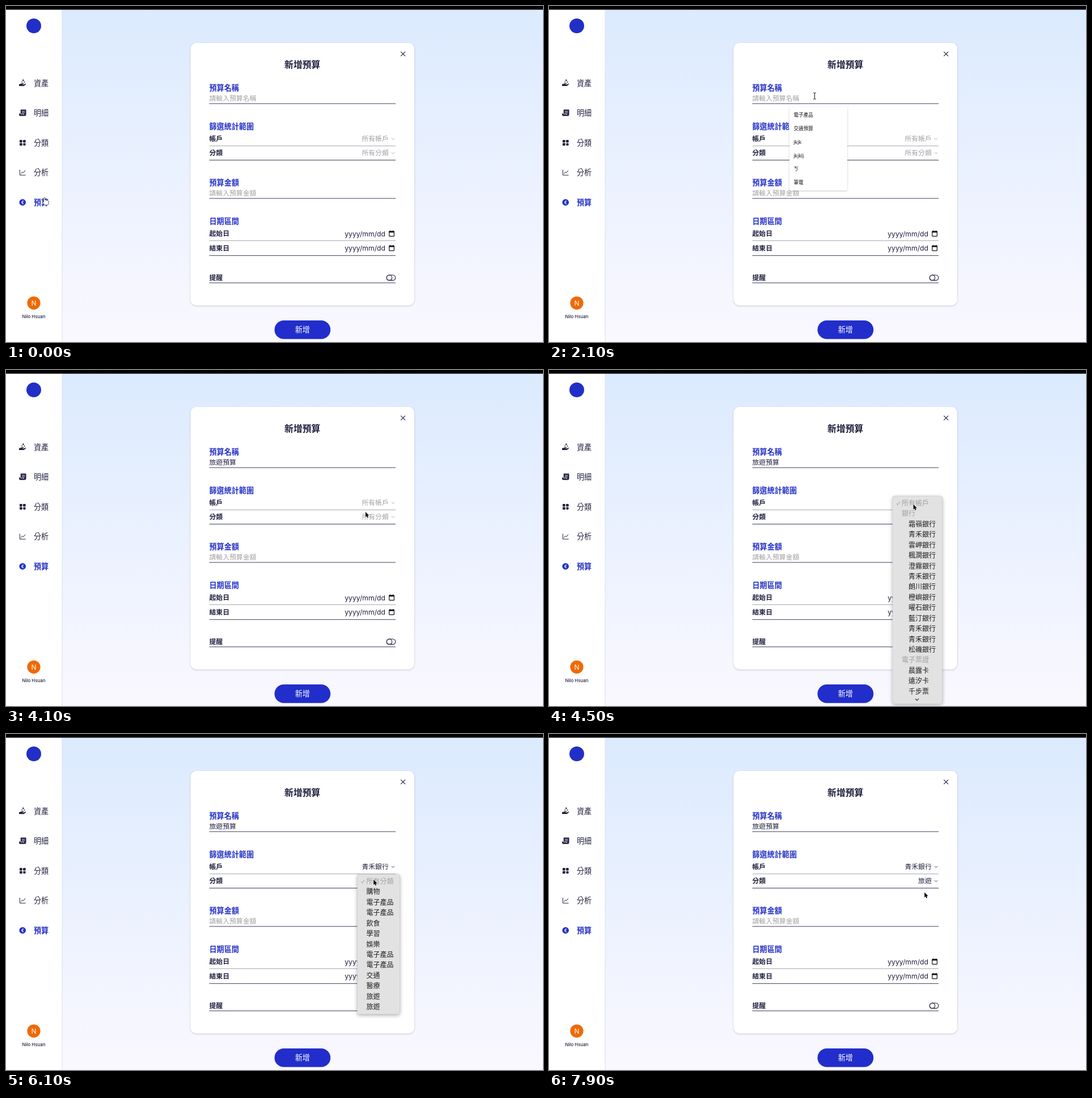
Recreate the animation shown at these times as an HTML page. Size 947 by 592 pixels, loop 8000 ms.

```html
<!DOCTYPE html>
<html lang="zh-TW">
<head>
<meta charset="utf-8">
<title>新增預算</title>
<style>
html, body { margin: 0; width: 100%; height: 100%; overflow: hidden; }
svg { display: block; width: 947px; height: 592px; }
text { font-family: Inter, "Noto Sans CJK TC", "Noto Sans CJK JP", "Noto Sans CJK", sans-serif; white-space: pre; }
</style>
</head>
<body>
<svg viewBox="0 0 947 592">
  <defs>
    <linearGradient id="sky" x2="0" y2="1">
      <stop stop-color="#dbeafe"/><stop offset="1" stop-color="#faf8ff"/>
    </linearGradient>
    <filter id="soft" x="-20%" y="-20%" width="140%" height="140%">
      <feDropShadow dx="0" dy="1" stdDeviation="1.5" flood-opacity=".22"/>
    </filter>
    <filter id="lift" x="-20%" y="-20%" width="140%" height="140%">
      <feDropShadow dx="0" dy="2" stdDeviation="3" flood-opacity=".3"/>
    </filter>
  </defs>
  <g id="page"></g>
  <g id="live"></g>
</svg>
<script>
const NAVY = '#20213f', BLUE = '#222fc6', GRAY = '#a2a2a2', ROW = 18.43, LOOP = 8000;
const page = document.getElementById('page'), live = document.getElementById('live');

// Text placed by the vertical centre of its line
const text = (s, x, cy, size = 11.85, fill = NAVY, weight = 400, anchor = 'start') =>
  `<text x="${x}" y="${cy + size * .37}" font-size="${size}" fill="${fill}" font-weight="${weight}" text-anchor="${anchor}">${s}</text>`;
const rect = (x, y, w, h, fill, more = '') =>
  `<rect x="${x}" y="${y}" width="${w}" height="${h}" fill="${fill}" ${more}/>`;
const circle = (x, y, r, fill, more = '') => `<circle cx="${x}" cy="${y}" r="${r}" fill="${fill}" ${more}/>`;
const line = (d, color = NAVY, w = 1) =>
  `<path d="${d}" fill="none" stroke="${color}" stroke-width="${w}" stroke-linejoin="round"/>`;
const shape = (d, fill = NAVY, more = '') => `<path d="${d}" fill="${fill}" ${more}/>`;

function sidebar() {
  const names = ['資產', '明細', '分類', '分析', '預算'];
  return rect(0, 0, 99, 592, '#fff') + rect(98.5, 0, 1, 592, '#d9dfec') +
    circle(49, 35, 13, BLUE) +
    names.map((s, i) => text(s, 49, 136 + 52.55 * i, 13.1, i == 4 ? BLUE : NAVY, i == 4 ? 700 : 500)).join('') +
    // assets
    circle(30.3, 130.9, 1.3, NAVY) + circle(32.3, 134, 1, NAVY) + circle(28.2, 134, .9, NAVY) +
    shape('M23 137.5h2.3l2-1.3h3.6q1.2 1-.5 1.7h-2v.6h3l2.6-1.7q1.5 0 1 1.2l-3.4 3H23z') +
    // records
    shape('M25.8 182.5h9.7v8.6q0 2.6-2.6 2.6h-7.3q-2.6 0-2.6-2.5v-1.6h2.8z') +
    line('M28 185.6h5.2M28 188h5.2M25.5 190.3h6v1.6', '#fff', .9) +
    // categories
    rect(24, 236, 4.7, 4.5, NAVY, 'rx=".8"') + rect(30, 236, 4.7, 4.5, NAVY, 'rx=".8"') +
    rect(24, 241.5, 4.7, 4.5, NAVY, 'rx=".8"') + circle(32.4, 243.8, 2.4, NAVY) +
    // analysis
    line('M24.4 288.5v9.5h10.2M26.3 295.6l2.3-3.2 2 1.6 3.4-4.4', NAVY, 1) +
    // budget
    circle(29.2, 346, 5.8, BLUE) + text('€', 29.2, 346, 7.5, '#fff', 700, 'middle') +
    circle(49, 523.3, 11.6, '#ee6a05') + text('N', 49, 523.3, 12, '#fff', 400, 'middle') +
    text('Nilo Hsuan', 49, 547, 7.9, NAVY, 500, 'middle');
}

function dateRow(label, cy) {
  return text(label, 358.5, cy, 11.85, NAVY, 700) +
    text('yyyy/mm/dd', 669, cy, 12.2, NAVY, 400, 'end') +
    rect(675.8, cy - 4, 8.6, 8.6, 'none', 'stroke="#111" stroke-width="1.2" rx=".6"') +
    rect(675.5, cy - 4.4, 9.2, 2.6, '#111') + rect(677, cy - 5.4, 1.2, 2, '#111') + rect(682, cy - 5.4, 1.2, 2, '#111');
}

function form() {
  const rules = [[172, 0], [246.5, 1], [271.5, 0], [339, 0], [413.5, 1], [439.7, 0], [487.8, 0]];
  const heads = [['預算名稱', 144], ['篩選統計範圍', 212], ['預算金額', 311], ['日期區間', 379]];
  const labels = [['帳戶', 234], ['分類', 259], ['提醒', 478.5]];
  return rect(325.5, 65, 394.5, 462.5, '#fff', 'rx="11" filter="url(#soft)"') +
    line('M696.3 80.6l7.8 7.8m0-7.8l-7.8 7.8', NAVY, 1.2) +
    text('新增預算', 522.7, 102.7, 15.8, NAVY, 700, 'middle') +
    heads.map(([s, y]) => text(s, 358.5, y, 13.1, BLUE, 700)).join('') +
    labels.map(([s, y]) => text(s, 358.5, y, 11.85, NAVY, 700)).join('') +
    rules.map(([y, pale]) => line(`M358.5 ${y}H687`, pale ? '#a9a9b2' : '#3b3c5c')).join('') +
    text('請輸入預算金額', 358.5, 330, 11.85, GRAY) +
    dateRow('起始日', 401) + dateRow('結束日', 426.5) +
    rect(671.2, 474, 15.6, 9.4, 'none', `rx="4.7" stroke="${NAVY}" stroke-width="1.1"`) +
    circle(676, 478.7, 4.7, 'none', `stroke="${NAVY}" stroke-width="1.1"`) +
    rect(473.5, 554, 98.7, 32.8, '#212ecb', 'rx="16.4"') +
    text('新增', 522.8, 570.4, 13.1, '#fff', 500, 'middle');
}

page.innerHTML = rect(0, 0, 947, 592, 'url(#sky)') + sidebar() + form() + rect(0, 0, 947, 6.5, '#000');

// Pointer stops: time, x, y
const stops = [
  [950, 66.5, 338], [1500, 522, 172], [1800, 468.5, 158.5], [3800, 468.5, 158.5],
  [4100, 634, 250], [4300, 642.6, 236.8], [4500, 642.6, 236.8], [4900, 639.8, 296.5],
  [5200, 639.8, 296.5], [5300, 639.8, 295.8], [5600, 639.8, 295.8], [6000, 648.2, 256.8],
  [6300, 648.2, 256.8], [6500, 648, 259], [6900, 648, 259], [7400, 652, 477],
  [7600, 652, 477], [7900, 662.2, 279]
];
function pointerAt(t) {
  const i = stops.findIndex(s => s[0] >= t);
  if (i <= 0) return (i ? stops.at(-1) : stops[0]).slice(1);
  const [t0, x0, y0] = stops[i - 1], [t1, x1, y1] = stops[i];
  const p = (t - t0) / (t1 - t0), e = p * p * (3 - 2 * p);
  return [x0 + (x1 - x0) * e, y0 + (y1 - y0) * e];
}

function pointer(t, x, y) {
  if (t >= 2300 && t < 3900) return '';
  const at = `transform="translate(${x} ${y})"`;
  if (x < 80) return shape('M0 1q0-1.5 1.2-1.5T2.4 1v3q1.8-.7 2.4.5 1.6-.5 2.1.7 1.7-.2 1.7 1.3v2.2q0 3-2 4.1H1.8Q-.6 10.4-2.5 7.4q.5-1.7 2.5.1z',
    '#fff', `${at} stroke="#222" stroke-width=".8"`);
  if (x > 358 && x < 687 && y > 152 && y < 172)
    return `<g ${at}>${line('M-2.5-5.7q2.5 0 2.5 1.5v8.4q0 1.5-2.5 1.5M2.5-5.7q-2.5 0-2.5 1.5v8.4q0 1.5 2.5 1.5', '#111', 1)}</g>`;
  return shape('M0 0v9l2-1.8 1.4 3.1 1.6-.7-1.4-3h2.8z', '#000', `${at} stroke="#fff" stroke-width=".7" paint-order="stroke"`);
}

// Phonetic input, one entry per 100 ms
const early = ['ㄌ', 'ㄌㄩ', '旅', '旅ㄧ', '旅ㄧㄡ', '旅遊', '旅遊預', '旅遊預ㄙ', '旅遊預ㄙㄨ', '旅遊御宿', '旅遊御宿'];
const late = ['旅遊預', '旅遊預ㄙ', '旅遊預ㄙㄨ', '旅遊預ㄙㄨㄢ', '旅遊預算'];
const typing = early.concat(late);

function nameField(t) {
  if (t < 2300) return text('請輸入預算名稱', 358.5, 163, 11.85, GRAY);
  const s = typing[(t - 2300) / 100], end = s ? 358.5 + 11.85 * s.length : 0;
  return text(s || '旅遊預算', 358.5, 163) +
    (s ? line(`M358.5 169.8H${end}`, NAVY, .9) + line(`M${end} 156.5V170`, '#111', .9) : '');
}

function picker(s, cy, chosen) {
  const color = chosen ? NAVY : GRAY;
  return text(s, 674.8, cy, 11.85, color, 400, 'end') + line(`M680 ${cy - 1.2}l2.5 2.5 2.5-2.5`, color, .9);
}

function suggestions() {
  const words = ['電子產品', '交通預算', 'jkjk', 'jkjklj', 'ㄎ', '筆電'];
  return `<g filter="url(#soft)">${rect(424, 178, 102, 147, '#fff', 'rx="2"')}${shape('M431 178.5l6-5 6 5z', '#fff')}</g>` +
    words.map((s, i) => text(s, 431.5, 192.3 + 23.7 * i, 8.6, '#111')).join('');
}

const bank = s => s + '銀行', PICK = bank('青禾');
const accounts = ['所有帳戶', '銀行',
  ...['霜嶺', '青禾', '雲岬', '楓澗', '澄霧', '青禾', '朗川', '橙嶼', '曜石', '藍汀', '青禾', '青禾', '松磯'].map(bank),
  '電子票證', '晨露卡', '遠汐卡', '千步票'];
const kinds = ['所有分類', '購物', '電子產品', '電子產品', '飲食', '學習', '娛樂', '電子產品', '電子產品', '交通', '醫療', '旅遊', '旅遊'];

function menu(items, x, y, w, h, indent, heads, cursorY, alpha) {
  const first = y + 12.6, hot = Math.round((cursorY - first) / ROW);
  const rows = items.map((s, i) => {
    const head = heads.includes(i), on = i == hot && !head, cy = first + ROW * i;
    return (on ? rect(x + 3.5, cy - 9.2, w - 7, ROW, '#4593f7', 'rx="2.5"') : '') +
      text(s, x + 16 + (head ? 0 : indent), cy, 12, head ? '#a1a1a1' : on ? '#fff' : '#1c1c1c');
  }).join('');
  return `<g opacity="${alpha}">` +
    rect(x, y, w, h, '#e2e2e2', 'rx="4" stroke="#c9c9c9" stroke-width=".7" filter="url(#lift)"') + rows +
    line(`M${x + 7} ${first + .5}l2 2.5 3.6-5.6`, '#999', 1) +
    (indent ? line('M646 579.2l3 3 3-3', '#222', 1.2) : '') + '</g>';
}

let shown = -1;
function draw(now) {
  const t = Math.floor(now % LOOP / 100) * 100;
  if (t != shown) {
    shown = t;
    const [x, y] = pointerAt(t);
    let out = nameField(t) +
      picker(t < 5700 ? '所有帳戶' : PICK, 234, t >= 5700) +
      picker(t < 7800 ? '所有分類' : '旅遊', 259, t >= 7800);
    if (t >= 2000 && t < 2300) out += suggestions();
    if (t >= 4300 && t <= 5600) out += menu(accounts, 606, 222, 87.5, 366, 12, [0, 1, 15], y, t < 5600 ? 1 : .06);
    if (t >= 6100 && t <= 7700) out += menu(kinds, 619.5, 247, 75, 246.5, 0, [0], t < 7700 ? y : 477, t < 7700 ? 1 : .06);
    live.innerHTML = out + pointer(t, x, y);
  }
  requestAnimationFrame(draw);
}
draw(0);
</script>
</body>
</html>
```
